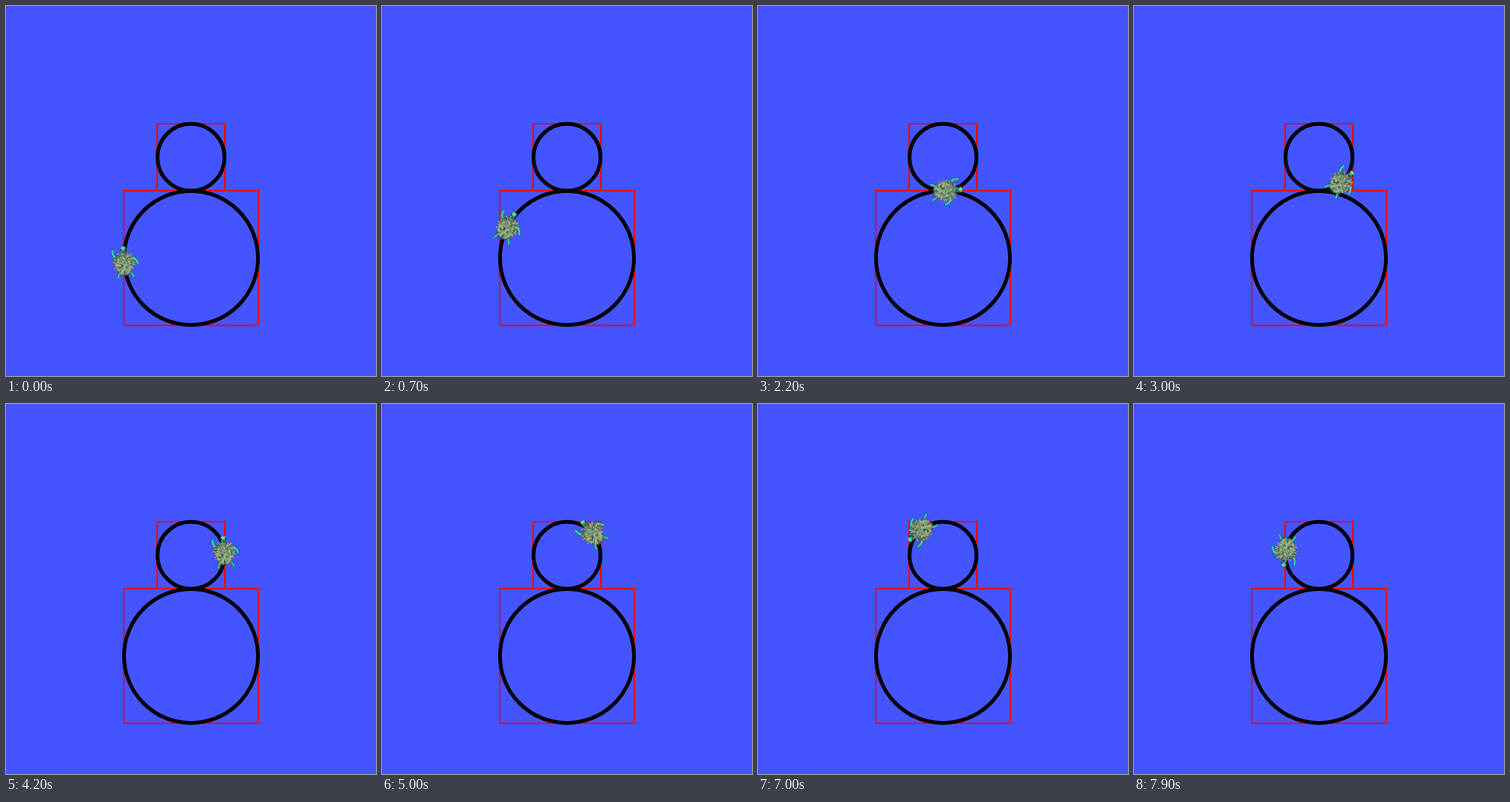
Recreate the animation shown at these times as an HTML page with a canvas. Size 497 px wide and 497 px high, loop 8000 ms.

```html
<!DOCTYPE html>
<html>
<head>
<meta charset="utf-8">
<style>
  html, body { margin: 0; width: 100%; height: 100%; overflow: hidden; background: #4455ff; }
  canvas { display: block; }
</style>
</head>
<body>
<canvas id="stage" width="497" height="497"></canvas>
<script>
const ctx = document.getElementById('stage').getContext('2d');
const TAU = Math.PI * 2, DEG = Math.PI / 180;
const BIG = { x: 248.5, y: 338.5, r: 90 };
const SMALL = { x: 248.5, y: 203.2, r: 45 };
const STEP = 4.5, STEP_MS = 100, STEPS = 80, SWITCH = 21;

function random(seed) {
  return () => (seed = (seed * 16807) % 2147483647) / 2147483647;
}

function ring({ x, y, r }) {
  ctx.strokeStyle = '#000';
  ctx.lineWidth = 5;
  ctx.beginPath();
  ctx.arc(x, y, r, 0, TAU);
  ctx.stroke();
}

function frame(x, y, w, h) {
  ctx.strokeStyle = '#ff0000';
  ctx.lineWidth = 2;
  ctx.strokeRect(x, y, w, h);
}

function dot(x, y, rx, ry, color) {
  ctx.fillStyle = color;
  ctx.beginPath();
  ctx.ellipse(x, y, rx, ry, 0, 0, TAU);
  ctx.fill();
}

// A tapered-looking limb: dark edge, teal body, bright highlight
function limb(x0, y0, cx, cy, x1, y1, width) {
  const layers = [['#14566e', width], ['#1fa9a8', width - 1], ['#45d3a4', width - 3]];
  ctx.lineCap = 'round';
  for (const [color, w] of layers) {
    ctx.strokeStyle = color;
    ctx.lineWidth = w;
    ctx.beginPath();
    ctx.moveTo(x0, y0);
    ctx.quadraticCurveTo(cx, cy, x1, y1);
    ctx.stroke();
  }
}

// Shell outline radius in direction a (0 = right, clockwise)
function shellPoint(a, k) {
  const taper = 1 - 0.15 * Math.sin(a);
  return [Math.cos(a) * 13.5 * k * taper, 1 + Math.sin(a) * 15.5 * k];
}

function shell() {
  const rnd = random(77);
  const spikes = 30;
  ctx.fillStyle = '#4d6354';
  ctx.beginPath();
  for (let i = 0; i < spikes * 2; i++) {
    const k = i % 2 ? 0.88 : 1.02 + rnd() * 0.14;
    ctx.lineTo(...shellPoint(i / spikes * Math.PI, k));
  }
  ctx.fill();

  ctx.fillStyle = '#7c9873';
  ctx.beginPath();
  for (let i = 0; i < 40; i++) ctx.lineTo(...shellPoint(i / 40 * TAU, 0.92));
  ctx.fill();

  const tones = ['#2d3c38', '#50664f', '#a3b98e', '#92ae83', '#65806a', '#b3c59c'];
  for (let i = 0; i < 290; i++) {
    const a = rnd() * TAU, k = Math.sqrt(rnd());
    const [x, y] = shellPoint(a, k);
    ctx.strokeStyle = tones[Math.floor(rnd() * tones.length)];
    ctx.lineWidth = 0.9;
    ctx.beginPath();
    ctx.moveTo(x, y);
    ctx.lineTo(x + Math.cos(a) * 1.8, y + Math.sin(a) * 1.8);
    ctx.stroke();
  }
}

function turtle(x, y, heading) {
  ctx.save();
  ctx.translate(x, y);
  ctx.rotate(heading * DEG);
  limb(-10, -7, -15, -10, -14.5, -17.5, 4.5);
  limb(7, -9, 15, -8, 18.5, 1, 4.5);
  limb(-6, 12, -9, 15, -9.5, 19.5, 4);
  limb(7, 12, 10, 14, 11.5, 18.5, 4);
  dot(0, -15.5, 3.5, 4.5, '#14424f');
  dot(0, -19, 4.2, 4, '#247f7b');
  dot(0, -19.8, 3, 2.5, '#5cc49c');
  dot(-0.5, -20.5, 1.3, 1.2, '#b9ca80');
  dot(-3, -18.2, 1, 1, '#17303a');
  dot(3, -18.2, 1, 1, '#17303a');
  shell();
  ctx.restore();
}

function pose(step) {
  if (step < SWITCH) {
    const turn = (step - 1) * STEP, a = turn * DEG;
    return [BIG.x - BIG.r * Math.cos(a), BIG.y - BIG.r * Math.sin(a), turn];
  }
  const turn = (step - SWITCH) * STEP, a = turn * DEG;
  return [SMALL.x + SMALL.r * Math.sin(a), SMALL.y + SMALL.r * Math.cos(a), 90 - turn];
}

function draw() {
  const step = Math.floor(performance.now() / STEP_MS) % STEPS;
  ctx.fillStyle = '#4455ff';
  ctx.fillRect(0, 0, 497, 497);
  frame(158, 248, 181, 181);
  frame(203, 158, 91, 90);
  ring(BIG);
  ring(SMALL);
  turtle(...pose(step));
  requestAnimationFrame(draw);
}
draw();
</script>
</body>
</html>
```
